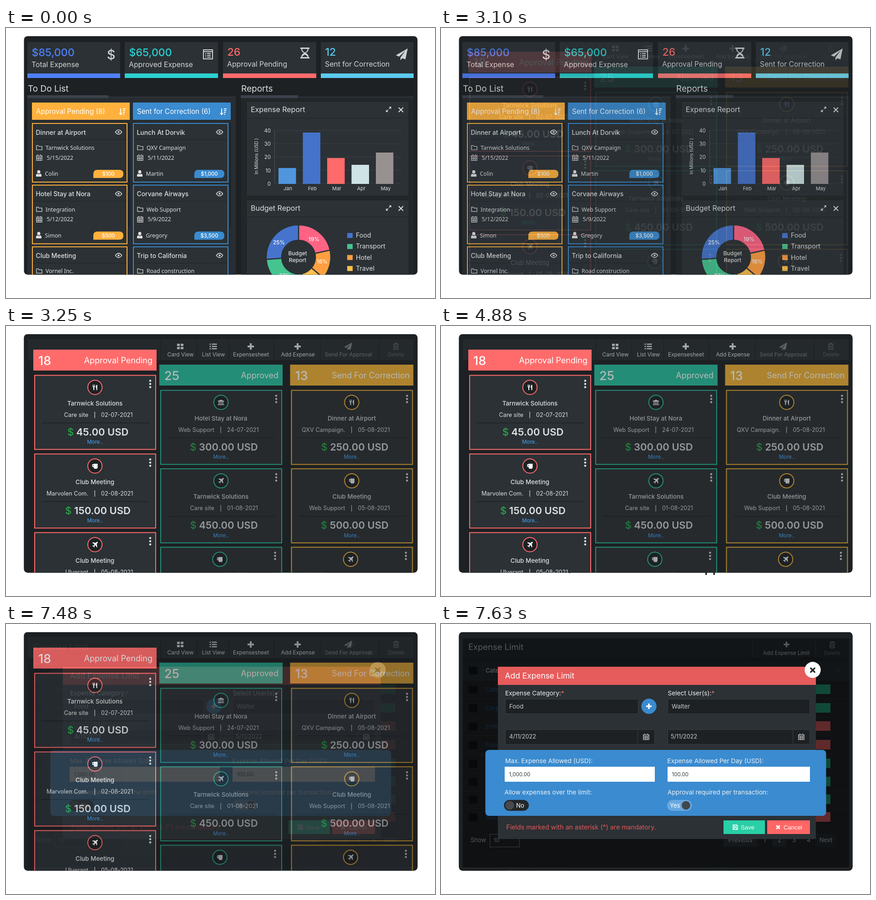
These frames come from a looping animation (943x594 px, 8000 ms). An HTML page:

```html
<!DOCTYPE html>
<html lang="en">
<head>
<meta charset="utf-8">
<title>Expense dashboard</title>
<style>
html, body { margin: 0; height: 100%; overflow: hidden; background: #fff; }
svg { display: block; width: 100vw; height: 100vh; font-family: Inter, sans-serif; }
.body { font-family: "Noto Sans", sans-serif; }
.button { font-family: "Liberation Sans", sans-serif; }
.mid { text-anchor: middle; }
.end { text-anchor: end; }
.medium { font-weight: 500; }
.semi { font-weight: 600; }
</style>
</head>
<body>
<svg id="stage" viewBox="0 0 943 594"></svg>
<script>
const PANEL = '#1d2124', CARD = '#2b3135', LIGHT = '#dfe1e2';
const CORAL = '#ff6b6b', AMBER = '#ffb13d', BLUE = '#3a8bd0';

// Icons are centred on 0,0: [path, stroke width]; width 0 means filled.
const icons = {
  eye: ['M-7 0Q0 -9.5 7 0Q0 9.5 -7 0ZM-1.3 0a1.3 1.3 0 1 0 2.6 0a1.3 1.3 0 1 0 -2.6 0', 1.6],
  folder: ['M-6 -4.5h4l1.5 2h6.5v7.5h-12z', 1.2],
  calendar: ['M-6 -4.5h12v11h-12zM-6 -1.5h12M-6 2.5h12M-2 -2v8M2 -2v8M-3 -7v3M3 -7v3', 1.2],
  user: ['M-3.5 -3.5a3.5 3.8 0 1 1 7 0a3.5 3.8 0 1 1 -7 0M-6 7V4Q-6 1 -3 .5Q0 3 3 .5Q6 1 6 4V7Z', 0],
  sort: ['M-4 -7V6M-7 3L-4 6.5L-1 3M1 -6h6M1 -2h5M1 2h4M1 6h2.5', 1.9],
  expand: ['M1 -1L5 -5M1.5 -5H5V-1.5M-1 1L-5 5M-1.5 5H-5V1.5', 1.5],
  close: ['M-5 -5L5 5M5 -5L-5 5', 1.9],
  note: ['M-10 -10H10V10H-10ZM-10 -6H10M-6 -2h2M-2 -2h8M-6 2h2M-2 2h8M-6 6h2M-2 6h8', 2],
  hourglass: ['M-10 -12H10V-9H8Q8 -3 2 0Q8 3 8 9H10V12H-10V9H-8Q-8 3 -2 0Q-8 -3 -8 -9H-10ZM-6 -9Q-5 -3 0 -1Q5 -3 6 -9ZM-6 9Q-3 4 0 4Q3 4 6 9Z', 0],
  send: ['M13 -13L-13 2L-6 5L8 -8L-3 7V13L1 8.5L8 11Z', 0],
  grid: ['M-7 -6h6v5h-6zM1 -6h6v5h-6zM-7 1h6v5h-6zM1 1h6v5h-6z', 0],
  list: ['M-8 -5h3M-3 -5h11M-8 0h3M-3 0h11M-8 5h3M-3 5h11', 2.6],
  plus: ['M-7 0H7M0 -7V7', 4],
  trash: ['M-6 -5H6M-2 -5V-7H2V-5M-4.5 -4V6.5H4.5V-4M-1.5 -2V4M1.5 -2V4', 1.6],
  utensils: ['M-5 -6V-2Q-5 0 -3.5 0V6H-1.5V0Q0 0 0 -2V-6H-1V-2H-2V-6H-3V-2H-4V-6ZM5 -6Q1.5 -5 2 1H3V6H5Z', 0],
  mug: ['M-3 -5H6V4H5V6H-2V4H-3V2H-6V-4H-3ZM-3 -2H-4.5V0H-3Z', 0],
  jet: ['M6 -6Q4 -7 2 -4L-5 -5L-6 -4L-1 -1L-3 2L-5.500 2L-6 3L-3 4L-2 6L-1 6L-1 3L1 1L4 6L5 5L4 -2Q7 -4 6 -6Z', 0],
  bank: ['M0 -6L7 -3V-1.500H-7V-3ZM-5 -1H-3V4H-5ZM-1 -1H1V4H-1ZM3 -1H5V4H3ZM-7 4.500H7V6H-7Z', 0],
  disk: ['M-5 -5H3L5 -3V5H-5ZM-3 -5V-1H2V-5M-3 5V1.500H3V5', 1.4]
};

const rect = (x, y, w, h, fill, more = '') =>
  `<rect x="${x}" y="${y}" width="${w}" height="${h}" fill="${fill}" ${more}/>`;
const box = (x, y, w, h, fill, stroke, width = 1) =>
  rect(x + width / 2, y + width / 2, w - width, h - width, fill, `stroke="${stroke}" stroke-width="${width}"`);
const circle = (x, y, r, fill, more = '') => `<circle cx="${x}" cy="${y}" r="${r}" fill="${fill}" ${more}/>`;
const text = (x, y, s, size, fill = LIGHT, cls = '') =>
  `<text x="${x}" y="${y}" font-size="${size}" fill="${fill}" class="${cls}">${s}</text>`;
const icon = (name, x, y, color = LIGHT, scale = 1) => {
  const [d, width] = icons[name];
  const paint = width ? `fill="none" stroke="${color}" stroke-width="${width}"` : `fill="${color}" fill-rule="evenodd"`;
  return `<path transform="translate(${x} ${y}) scale(${scale})" d="${d}" ${paint}/>`;
};
const each = (items, draw) => items.map(draw).join('');

function stat(x, w, value, label, color, lift, symbol) {
  return rect(x, 31, w, 69, CARD) + rect(x, 100, w, 10, color) +
    text(x + 9.5, 62 - lift, value, 23.2, color, 'medium') + text(x + 9, 86 - lift, label, 15.8, '#d3d5d6') + symbol;
}

function heading(x, title, thick, right) {
  return text(x, 140, title, 19) + rect(x, 151, right - x, 1.5, '#343a40') + rect(x - 1, 148, thick, 6, '#3c434c');
}

function todoCard(x, y, color, [title, project, date, person, amount]) {
  const pill = x + 135, top = y + 103;
  return box(x, y, 210, 131, CARD, color, 2) + rect(x + 2, y + 36, 206, 1, '#1f2427') +
    text(x + 8.500, y + 25.500, title, 13.9, LIGHT, 'medium') + icon('eye', x + 190.500, y + 20) +
    icon('folder', x + 16, y + 54) + text(x + 30, y + 59, project, 12.3, LIGHT, 'body') +
    icon('calendar', x + 16, y + 76) + text(x + 32.500, y + 80.500, date, 12.3, LIGHT, 'body') +
    icon('user', x + 15, y + 111) + text(x + 28.500, y + 116, person, 12.3, LIGHT, 'body') +
    `<path d="M${pill} ${top + 18}V${top + 9}q0-9 9-9h48q9 0 9 9t-9 9z" fill="${color}"/>` +
    text(pill + 33, top + 13, amount, 11.4, '#fff', 'mid medium');
}

function todoColumn(x, color, title, cards) {
  return rect(x, 164, 215, 38, color) + text(x + 9, 189, title, 15.2, '#fff') + icon('sort', x + 199, 184, '#fff') +
    each(cards, (card, i) => todoCard(x, 209 + i * 135.700, color, card)) + rect(x + 213, 209, 2, 228, '#1a1e21');
}

function reportCard(y, h, title) {
  return box(528, y, 358, h, CARD, '#1e2225') + rect(528, y + 37, 358, 1, '#1e2225') +
    text(538, y + 24, title, 16) + icon('expand', 841, y + 18) + icon('close', 868, y + 19);
}

function barChart() {
  const bars = [['Jan', 308, '#5096df'], ['Feb', 230, '#4573cb'], ['Mar', 286, CORAL], ['Apr', 301, '#cde3e5'], ['May', 274, '#979192']];
  return each([40, 30, 20, 10, 0], (n, i) =>
      rect(590, 225 + i * 29.300, 281, 1, '#3b4146') + text(582, 230 + i * 29.200, n, 11.4, LIGHT, 'end')) +
    rect(590, 225, 1, 118, '#4a5055') +
    each(bars, ([month, top, color], i) =>
      rect(599 + i * 53.500, top, 38.500, 343 - top, color) + text(619.500 + i * 53.800, 357, month, 11, LIGHT, 'mid')) +
    `<g transform="translate(554 322) rotate(-90)">${text(0, 0, 'In Millions (USD )', 9.8)}</g>`;
}

function donut() {
  const edges = [0, 77.5, 130, 169, 266, 360];
  const colors = ['#ff6384', '#ff9f40', '#ffc04c', '#45c490', '#4674cd'];
  const point = (r, deg) => {
    const a = deg * Math.PI / 180;
    return `${643 + r * Math.sin(a)} ${504 - r * Math.cos(a)}`;
  };
  const legend = [['Food', 4], ['Transport', 3], ['Hotel', 1], ['Travel', 2]];
  return each(colors, (color, i) => {
      const [a, b] = [edges[i], edges[i + 1]];
      return `<path d="M${point(71, a)}A71 71 0 0 1 ${point(71, b)}L${point(37, b)}A37 37 0 0 0 ${point(37, a)}Z" fill="${color}" stroke="${CARD}" stroke-width="2.500"/>`;
    }) +
    each([['25%', 600, 476], ['19%', 677, 469], ['16%', 695, 518], ['27%', 613, 549]],
      ([s, x, y]) => text(x, y, s, 11.7, '#fff', 'mid medium')) +
    text(641, 500, 'Budget', 12, LIGHT, 'mid medium') + text(641, 515, 'Report', 12, LIGHT, 'mid medium') +
    each(legend, ([name, c], i) => rect(750, 451 + i * 24.200, 12, 11, colors[c]) + text(769, 461 + i * 24.300, name, 14.2));
}

function dashboard() {
  const gray = '#d0d3d4';
  return stat(47, 204, '$85,000', 'Total Expense', '#4f80fa', 0, text(231, 69, '$', 29, gray, 'mid medium')) +
    stat(261, 205, '$65,000', 'Approved Expense', '#2bd1d0', 0, icon('note', 444, 58, gray)) +
    stat(477, 205, '26', 'Approval Pending', CORAL, 1, icon('hourglass', 657, 55, gray)) +
    stat(692, 204, '12', 'Sent for Correction', '#5bcaef', 1, icon('send', 870, 58, gray)) +
    rect(47, 152, 458, 391, '#282d31') + rect(517, 152, 379, 391, '#22272a') +
    heading(48, 'To Do List', 178, 505) + heading(517, 'Reports', 126, 896) +
    todoColumn(57, AMBER, 'Approval Pending (8)', [
      ['Dinner at Airport', ' Tarnwick Solutions', '5/15/2022', 'Colin', '$100'],
      ['Hotel Stay at Nora', 'Integration', '5/12/2022', 'Simon', '$500'],
      ['Club Meeting', 'Vornel Inc.', '', '', '']]) +
    todoColumn(279, BLUE, 'Sent for Correction (6)', [
      ['Lunch At Dorvik', 'QXV Campaign', '5/11/2022', 'Martin', '$1,000'],
      ['Corvane Airways', 'Web Support', '5/9/2022', 'Gregory', '$3,500'],
      ['Trip to California', 'Road construction', '', '', '']]) +
    reportCard(161, 209, 'Expense Report') + barChart() +
    reportCard(378, 200, 'Budget Report') + donut();
}

function claimCard(x, y, color, dim, [symbol, title, project, date, amount]) {
  const ink = dim ? '#96999b' : LIGHT, cx = x + 133.500;
  const shift = title ? 0 : -2.500;
  return box(x, y, 268, 165, dim ? '#262a2d' : CARD, color, 2) +
    circle(cx + shift, y + 27.500, 15.700, PANEL, `stroke="${color}" stroke-width="2"`) +
    icon(symbol, cx + shift, y + 27.500, dim ? '#a5a8a9' : '#fff') +
    each([13, 20, 27], dy => circle(x + 255 + shift, y + dy, 2.300, ink)) +
    (title && text(cx, y + 67, title, 13.4, ink, 'mid medium') +
      text(x + 119, y + 92, project, 12.8, ink, 'end') + rect(cx - 1, y + 81, 1.200, 14, ink) +
      text(x + 147, y + 92, date, 12.5, ink) + rect(x + 16, y + 105, 237, 1.500, PANEL) +
      text(x + 140, y + 133, `<tspan fill="${dim ? '#237d3b' : '#28a745'}" font-weight="500">$</tspan> ${amount} USD`, 22, ink, 'mid semi') +
      text(cx, y + 151.500, 'More..', 11.4, dim ? '#397fc0' : '#4ba3f5', 'mid'));
}

function claimColumn(x, y, color, dim, count, title, cards) {
  const ink = dim ? '#b5b9b8' : '#fff';
  return rect(x - 2, y, 271, 46, color) + text(x + 9, y + 33.500, count, 27, ink, 'medium') +
    text(x + 260 + (x > 600 ? 1 : 0), y + 30, title, 18, ink, 'end') +
    each(cards, (card, i) => claimCard(x, y + 55.500 + i * (dim ? 172.600 : 173), color, dim, card));
}

function evaluation() {
  const tools = [[383, 'grid', 'Card View'], [455.500, 'list', 'List View'], [538, 'plus', 'Expensesheet'],
    [641, 'plus', 'Add Expense'], [752, 'send', 'Send For Approval'], [857, 'trash', 'Delete']];
  return rect(48, 29, 848, 46, '#24292c') + each([339, 419, 489, 589, 690, 820], x => rect(x, 30, 1, 45, '#1a1e20')) +
    each(tools, ([x, symbol, label], i) => {
      const ink = i < 4 ? '#a5a8a9' : i < 5 ? '#606466' : '#484c4e';
      return icon(symbol, x, 45, ink, symbol === 'send' ? .68 : 1) + text(x + .5, 67, label, 11.9, ink, 'mid');
    }) +
    claimColumn(62, 52, CORAL, false, 18, 'Approval Pending', [
      ['utensils', 'Tarnwick Solutions', 'Care site', '02-07-2021', '45.00'],
      ['mug', 'Club Meeting', 'Marvolen Com.', '02-08-2021', '150.00'],
      ['jet', 'Club Meeting', 'Ulverant', '05-08-2021', '']]) +
    claimColumn(339, 85, '#248d77', true, 25, 'Approved', [
      ['bank', 'Hotel Stay at Nora', 'Web Support', '24-07-2021', '300.00'],
      ['jet', 'Tarnwick Solutions', 'Care site', '01-08-2021', '450.00'],
      ['mug', '']]) +
    claimColumn(626.500, 85, '#ae832f', true, 13, 'Send For Correction', [
      ['utensils', 'Dinner at Airport', 'QXV Campaign.', '05-08-2021', '250.00'],
      ['mug', 'Club Meeting', 'Web Support', '05-08-2021', '500.00'],
      ['jet', '']]);
}

function limitTable() {
  const dim = '#56595b', rows = [102, 144, 185, 225, 266, 307, 347, 386, 425];
  const names = ['Category', 'Catering', 'Corporate', 'Entertainment', 'Food', '', '', '', 'Saturday'];
  return rect(48, 32, 849, 505, '#0f1113') + rect(48, 32, 849, 42, '#121517') + rect(48, 82, 849, 43, '#121517') +
    text(60, 57, 'Expense Limit', 18.4, dim) + rect(685, 32, 1, 42, '#1d2022') + rect(823, 32, 1, 42, '#1d2022') +
    icon('plus', 759.500, 45, dim, .9) + text(759, 68, 'Add Expense Limit', 11.7, dim, 'mid') +
    icon('trash', 860, 46, '#3a3d3f') + text(860, 68, 'Delete', 11.9, '#303335', 'mid') +
    each(rows, (y, i) => rect(61, y - 8, 19, 17, '#08090a') + rect(48, y + 20, 849, 1, '#141719') +
      text(98, y + 4.500, names[i], 13, i ? '#142a40' : dim, i ? '' : 'medium') +
      (i && rect(790, y - 11, 66, 21, [3, 4, 8].includes(i) ? '#602a2b' : '#104937') || '')) +
    rect(91, 82, 1, 43, '#1a1d1f') + text(873, 107, '⇕', 10, '#25282a', 'mid') +
    text(65, 480, 'Show', 13, dim) + box(107, 462, 66, 29, 'none', '#3b3e40') + text(116, 480, '10', 12, dim) +
    rect(621, 462, 75, 28, '#15181a') + rect(729, 462, 30, 28, '#15181a') + rect(823, 462, 45, 28, '#121517') +
    each([['Previous', 658], ['1', 711], ['2', 744], ['3', 776], ['4', 808], ['Next', 846]],
      ([s, x]) => text(x, 480, s, 13, dim, 'mid')) +
    rect(48, 536, 849, 1, '#303335');
}

function limitForm() {
  const dark = '#1d2124', edge = '#363c40', star = `<tspan fill="${CORAL}">*</tspan>`;
  const field = (x, y, w, value, size = 13.3) => box(x, y, w, 33, dark, edge) + text(x + 9, y + 21, value, size, '#c9cbcc');
  const dateField = (x, w, value, inset) => box(x, 232, w, 33, dark, edge) + text(x + inset, 252, value, 12.7, '#c9cbcc') +
    rect(x + w - 38, 232, 1, 33, edge) + icon('calendar', x + w - 19, 248);
  const amount = (x, w, value) => rect(x, 314, w, 33, '#fff') + text(x + 9.500, 334.500, value, 11.5, '#33373a');
  const label = (x, y, s) => text(x, y, s, 13.7, '#f0f2f3');
  return rect(125, 94, 699, 379, '#2b3135') + rect(125, 94, 699, 40, '#e65b5b') +
    text(140.500, 120, 'Add Expense Limit', 17.4, '#fff') +
    circle(817, 101, 17.700, '#fff') + `<g stroke-linecap="round">${icon('close', 817, 101.500, '#24282b', 1)}</g>` +
    `<path d="M812.500 97l9 9m0-9l-9 9" stroke="#24282b" stroke-width="3.500"/>` +
    label(141, 157, 'Expense Category:' + star) + label(498.500, 157, 'Select User(s):' + star) +
    field(141, 165, 293, 'Food') + field(498, 165, 313, 'Walter') +
    circle(457, 181, 16.700, BLUE) + icon('plus', 457, 181, '#fff', .85) +
    dateField(141, 329, '4/11/2022', 9) + dateField(498, 313, '5/11/2022', 7) +
    rect(97.500, 277, 749, 145, BLUE, 'rx="8"') +
    label(141, 306, 'Max. Expense Allowed (USD):') + label(497.500, 306, 'Expense Allowed Per Day (USD):') +
    amount(140, 330, '1,000.00') + amount(498, 313, '100.00') +
    label(139.500, 375, 'Allow expenses over the limit:') + label(498, 375, 'Approval required per transaction:') +
    rect(138.500, 387, 54.500, 24, '#22272a', 'rx="12"') + circle(151, 399, 9.500, '#484b4d') + text(165, 404, 'No', 13.3, '#fff') +
    rect(497, 387, 54.500, 24, '#68a8e0', 'rx="12"') + circle(538.500, 399, 9.500, '#41474b') + text(503, 404, 'Yes', 13.3, '#fff') +
    text(143.500, 452, 'Fields marked with an asterisk (*) are mandatory.', 14.2, '#e25858') +
    rect(621, 432, 91, 30, '#29cfa6') + icon('disk', 647, 447, '#fff') + text(659, 452, 'Save', 13.2, '#fff', 'button') +
    rect(717, 432, 94, 30, '#ff6666') + icon('close', 741, 447, '#fff', .8) +
    `<path d="M737.500 443.500l7 7m0-7l-7 7" stroke="#fff" stroke-width="3"/>` + text(753, 452, 'Cancel', 13.2, '#fff', 'button');
}

const caption = (id, s) => `<g id="${id}">${text(472.500, 583, s, 28.2, '#000', 'mid medium')}</g>`;
const scene = (id, content) => `<g id="${id}" clip-path="url(#panel)">${rect(39, 18, 866, 525, PANEL)}${content}</g>`;

document.getElementById('stage').innerHTML =
  `<clipPath id="panel">${rect(39.500, 18, 865, 524.500, '#000', 'rx="8"')}</clipPath>` +
  `<clipPath id="below">${rect(0, 543, 943, 51, '#000')}</clipPath>` +
  `<g clip-path="url(#below)">${caption('caption1', 'Customized Dashboard')}${caption('caption2', 'Quick Evaluation And Approval')}</g>` +
  scene('scene1', dashboard()) + scene('scene2', evaluation()) + scene('scene3', limitTable() + limitForm());

const byId = id => document.getElementById(id);
// Progress from 0 to 1 in equal held steps.
const stepped = (t, start, hold, count) => Math.max(0, Math.min(1, (Math.floor((t - start) / hold) + 1) / count));

function slideCaption(id, t, start, end) {
  const p = stepped(t, start, 100, 7);
  byId(id).setAttribute('transform', `translate(0 ${(p - 1) * 48})`);
  byId(id).setAttribute('visibility', p > 0 && t < end ? 'visible' : 'hidden');
}

function frame() {
  const t = performance.now() % 8000;
  slideCaption('caption1', t, 500, 3100);
  slideCaption('caption2', t, 4880, 7480);
  byId('scene2').setAttribute('opacity', stepped(t, 3100, 30, 6));
  byId('scene3').setAttribute('opacity', stepped(t, 7480, 30, 6));
  requestAnimationFrame(frame);
}
frame();
</script>
</body>
</html>
```
